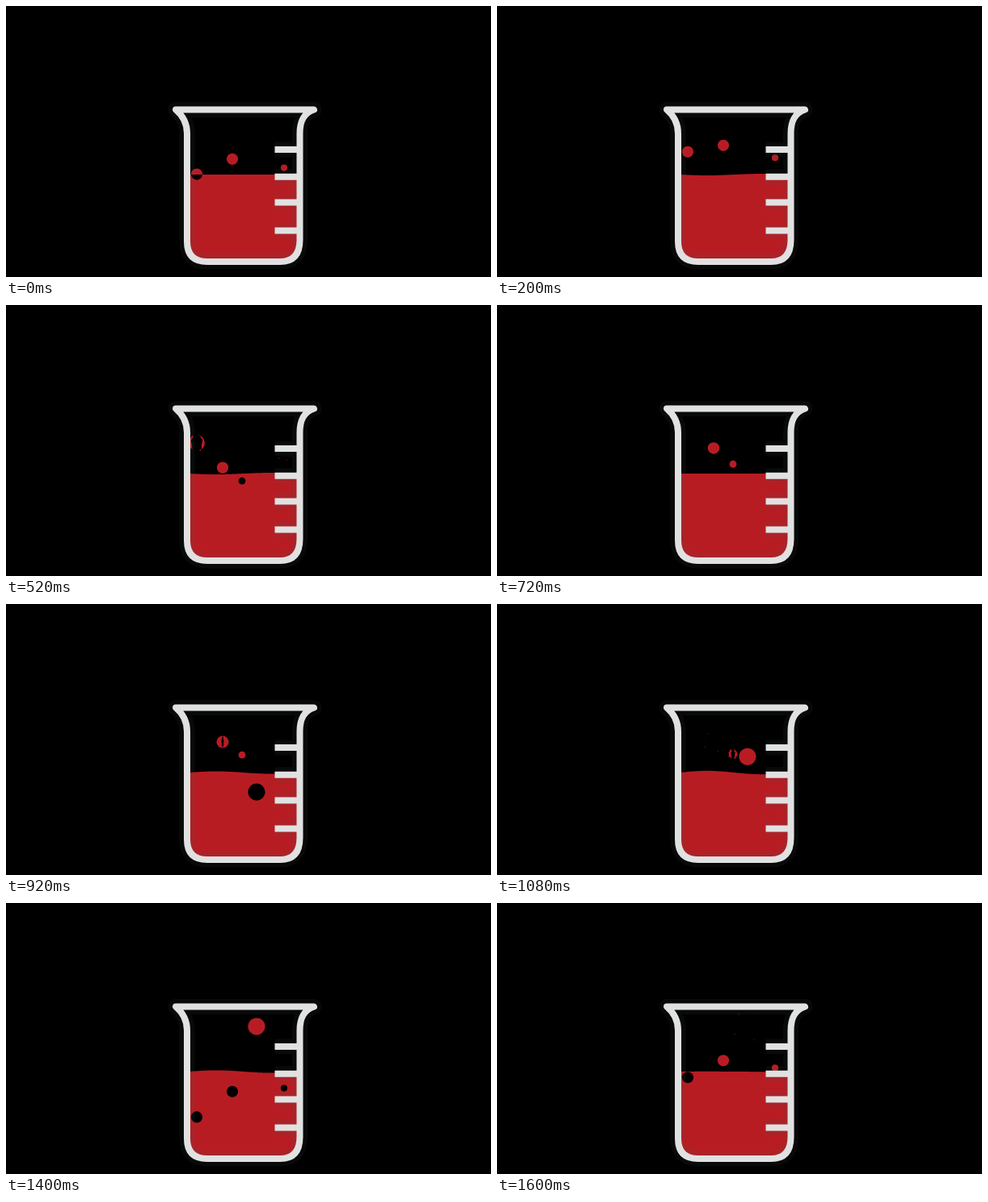
Write an HTML page with a canvas that moves like this. It is 600x336 px and loops after 1640 ms.

```html
<!DOCTYPE html>
<html lang="en">
<head>
<meta charset="utf-8">
<title>Bubbling beaker</title>
<style>
  html, body { margin: 0; width: 100%; height: 100%; overflow: hidden; background: #000; }
  canvas { display: block; }
</style>
</head>
<body>
<canvas id="stage" width="600" height="336"></canvas>
<script>
const ctx = document.getElementById('stage').getContext('2d');
const LOOP = 1640, STEP = 40, RISE = 650, POP = 680, POP_TIME = 160;
const RED = '#b81c23', GLASS = '#e1e1e1', HALO = 'rgba(70,80,80,.12)';

// x, radius, resting height, distance risen, start time
const bubbles = [
  [236, 7.1, 171, 94.4, 1400],
  [280, 7.1, 171, 94.4, 1280],
  [344, 4.1, 186, 56.6, 1320],
  [268, 7.2, 171, 94.4, 240],
  [292, 4.4, 186, 56.6, 360],
  [310, 10.6, 153, 141, 760]
];

const beaker = new Path2D(
  'M210 128.5C219 136 224 145 224 158V292Q224 317 249 317H339' +
  'Q363.5 317 363.5 290V158C363.5 143 368 133 381 128.5Z');
const ticks = new Path2D('M332.5 178H362M332.5 211.7H362M332.5 243.5H362M332.5 278.5H362');
const glass = new Path2D(beaker);
glass.addPath(ticks);

function disc(x, y, r) {
  ctx.beginPath();
  ctx.arc(x, y, r, 0, 2 * Math.PI);
  ctx.fill();
}

function drawLiquid(t) {
  const swell = t < 720
    ? -1.3 * Math.sin(Math.PI * t / 720)
    : 2.3 * Math.sin(Math.PI * (t - 720) / 900);
  ctx.beginPath();
  for (let x = 226; x <= 362; x += 2)
    ctx.lineTo(x, 209 - swell * Math.sin(2 * Math.PI * (x - 226) / 136));
  ctx.lineTo(362, 292);
  ctx.quadraticCurveTo(362, 315, 339, 315);
  ctx.lineTo(249, 315);
  ctx.quadraticCurveTo(226, 315, 226, 292);
  ctx.fill();
}

function drawBurst(x, y, r, p) {
  const spread = r * (1.05 + .7 * p);
  if (p < 1) {
    disc(x, y, spread);
    // Jagged tear that splits the bubble into two crescents
    ctx.globalCompositeOperation = 'destination-out';
    ctx.beginPath();
    for (let i = 0; i < 14; i++) {
      const a = i * Math.PI / 7 + .2, k = i % 2 ? 1.05 : .85;
      ctx.lineTo(x + r * (.2 + 1.6 * p) * k * Math.cos(a), y + r * (1 + 1.8 * p) * k * Math.sin(a));
    }
    ctx.fill();
    ctx.globalCompositeOperation = 'source-over';
  }
  if (p > 0)
    for (let i = 0; i < 6; i++) {
      const a = -2.2 + i * 2.4;
      disc(x + spread * Math.cos(a), y + spread * Math.sin(a), (1.2 - .7 * p) * (i % 2 ? .6 : 1));
    }
}

function drawBubble([x, r, top, distance, start], t) {
  const age = (t - start + LOOP) % LOOP;
  if (age > POP + POP_TIME) return;
  const left = Math.max(0, 1 - age / RISE);
  const y = top + distance * left * left;
  if (age >= POP) return drawBurst(x, y, r, (age - POP) / POP_TIME);
  // Red in the air, a hole inside the liquid
  ctx.globalCompositeOperation = 'xor';
  disc(x, y, r);
  ctx.globalCompositeOperation = 'source-over';
}

function stroke(path, color, width) {
  ctx.strokeStyle = color;
  ctx.lineWidth = width;
  ctx.stroke(path);
}

function draw(now) {
  const t = Math.floor((now + 1) / STEP) * STEP % LOOP;
  ctx.clearRect(0, 0, 600, 336);
  ctx.fillStyle = RED;
  drawLiquid(t);
  for (const b of bubbles) drawBubble(b, t);
  ctx.lineJoin = 'round';
  stroke(glass, HALO, 19);
  stroke(glass, GLASS, 8);
  requestAnimationFrame(draw);
}
requestAnimationFrame(draw);
</script>
</body>
</html>
```
